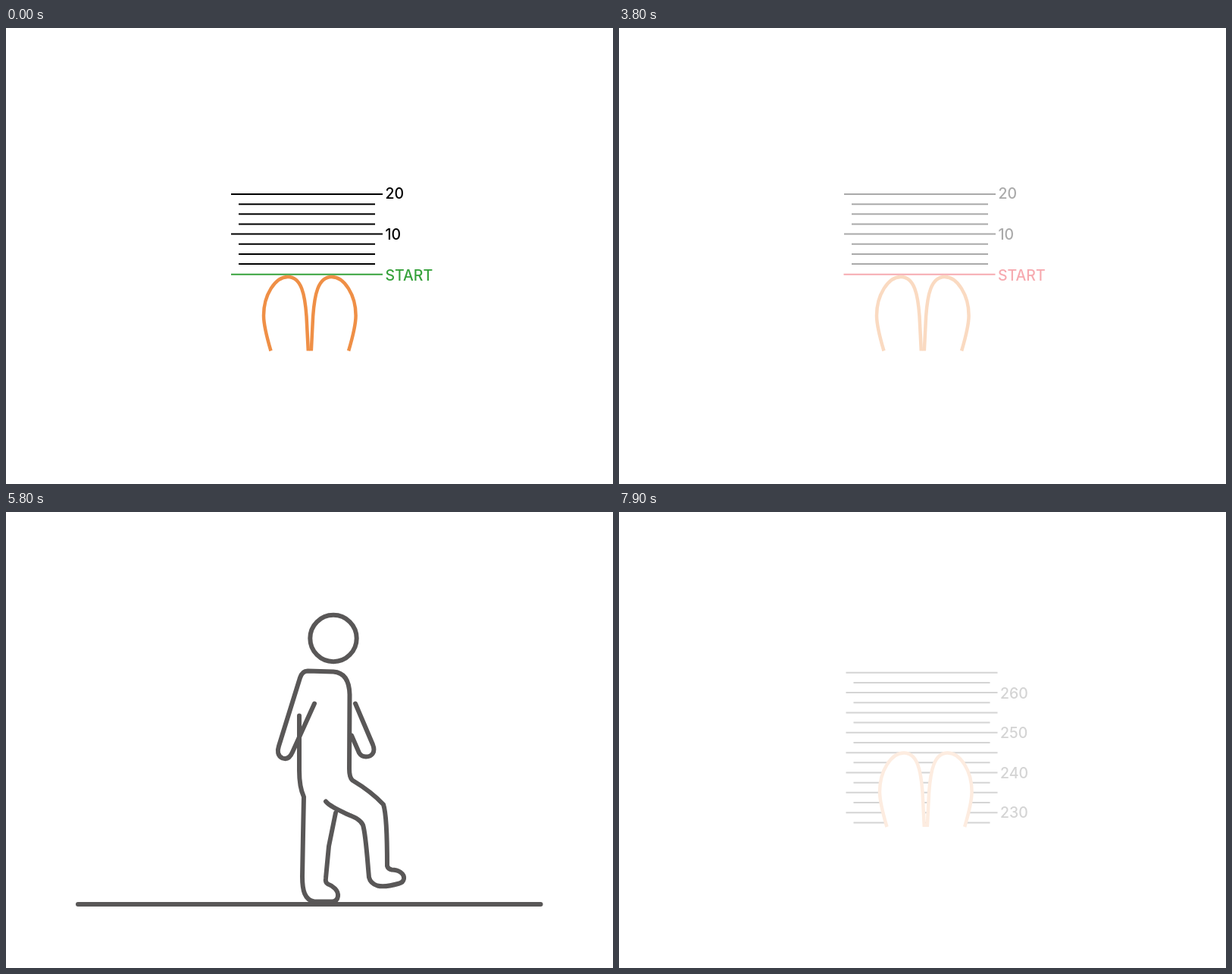
These frames come from a looping animation (801 px wide and 601 px high, 8 s). An HTML page:

```html
<!DOCTYPE html>
<html lang="en">
<head>
<meta charset="utf-8">
<title>Two-step walk</title>
<style>
  html, body { margin: 0; width: 100%; height: 100%; overflow: hidden; background: #fff; }
  svg { display: block; width: 801px; height: 601px; }
  text { font: 500 19.5px Inter, sans-serif; }
  .rule { stroke: #000; stroke-width: 2; }
  .feet { fill: #fff; stroke: #ef8f46; stroke-width: 4.5; }
  .walk { fill: none; stroke: #595757; stroke-width: 6; stroke-linecap: round; stroke-linejoin: round; }
</style>
</head>
<body>
<svg viewBox="0 0 801 601">
  <defs>
    <path id="foot" d="M349.5,425.5 C344,407 340,390 340,379 C340,352 355,328 372,328 C390,328 394.5,352 396.5,380 L398.8,425.5"/>
    <g id="feet" class="feet">
      <use href="#foot"/>
      <use href="#foot" transform="translate(801.6 0) scale(-1 1)"/>
    </g>
  </defs>
  <g id="start">
    <g id="startRules"></g>
    <g id="startLine">
      <path d="M297,324.8H497" stroke="currentColor" stroke-width="2"/>
      <text x="500.5" y="333" fill="currentColor">START</text>
    </g>
    <use href="#feet"/>
  </g>
  <g id="walk" class="walk">
    <path id="ground" d="M95,516.6H705.5"/>
    <g id="figure">
      <circle id="head" r="30.7"/>
      <path id="body"/>
    </g>
  </g>
  <g id="result">
    <g id="resultRules"></g>
    <use href="#feet" transform="translate(4 -10.5)"/>
  </g>
</svg>
<script>
const $ = id => document.getElementById(id);
const LOOP = 8000;

const rule = (x, y, width) => `<path class="rule" d="M${x},${y}h${width}"/>`;
const label = (x, y, value) => `<text x="${x}" y="${y}">${value}</text>`;

function rules(count, left, top, gap, longEvery) {
  let out = '';
  for (let i = 0; i < count; i++) {
    const inset = i % longEvery ? 10 : 0;
    out += rule(left + inset, top + i * gap, 200 - 2 * inset);
  }
  return out;
}

$('startRules').innerHTML = rules(8, 297, 219, 13.15, 4) +
  label(500.5, 225.3, 20) + label(500.5, 279, 10);
$('resultRules').innerHTML = rules(16, 299.5, 211.7, 13.18, 2) +
  [260, 250, 240, 230].map((n, i) => label(503, 246 + i * 52.4, n)).join('');

const STAND = {
  head: [137.3, 164.5],
  d: `M129,372 C118,371 113,362 112.5,348 L109,240 L110,222 Q111,210 122,210 L152,210
    C168,210 176,222 176,240 L176.5,322 C174,360 173,400 172.5,440 L172,487 Q172,490 176,492
    C184,495 189,501 187,507 Q186,513 180,513 L162,513 C150,513 145,510 143,500
    C141,492 141,480 139.5,468 L134,422 L129,372
    M118,254 L145,323 C148,331 153,334 159,333 C164,331 166,326 165,322 L141,232`
};

// The walking poses share one path layout so they can be blended:
// rear arm, torso and front leg; back and rear leg; front arm.
const STRIDE = {
  head: [314.5, 182.5],
  d: `M281,270 L230,331 C226,336 222,337.5 217.5,336 C210.5,333.5 210.5,326 214,321
    L271,233 Q274,226 281,226 L313,228 C328,229 334,240 334.5,258 L328,360 Q328,374 331,377
    C350,391 375,408 388,425 C398,445 407,470 414,490 Q416,492 421,492
    C430,492 437,497 436,504 Q435,508 430,510 C422,513 412,517 402,517 Q395,517 391,509
    C384,494 370,462 357,445 C353,440 345,437 335,432 C310,419 280,406 269,395
    M267,290 L262.5,360 Q262,372 258,381 L220,428 L168,463 C153,475 150,485 162,496
    L178,510 Q182,514 186,509 C192,503 190,492 187,488 Q186,483 191,481 L247,454 L292,419
    M341,272 L371,330 C376,340 370,347 362,347 Q356,347 353,342 L338,320`
};
const LIFT = {
  head: [182, 166],
  d: `M157,252 L128,316 C125,323 121,326 115,324 C108,321 108,314 110,308
    L138,218 Q141,209 148,209 L182,210 C197,211 203,222 203.5,240 L203,338 Q203,349 207,353
    C222,362 236,372 248,385 C253,400 253,440 253,466 Q254,470 259,471
    C268,471 276,476 275,483 Q274,488 269,489 C262,491 248,494 240,492 Q231,489 229,481
    C227,460 225,425 221,412 C218,405 210,402 203,399 C190,393 178,388 172,381
    M137,268 L137,340 Q137,362 143,375 L142,425 L141,480 C141,498 144,511 157,513
    L180,513 Q187,513 188,506 C189,498 181,492 175,490 Q171,488 172,482 L176,440 L185,396
    M211,252 L234,306 C238,316 233,322 225,322 Q219,322 216,317 L206,294`
};
const PASS = {
  head: [150, 165],
  d: `M131,252 L125,318 C124,326 119,331 113,329 C107,327 105,322 106,315
    L112,222 Q113,209 122,209 L157,209 C175,210 186,222 187,240 L187,330 Q187,342 186,352
    C185,375 182,400 181,420 C179,445 177,470 176,486 Q177,490 181,491
    C189,493 193,501 191,507 Q189,513 182,513 C174,514 165,513 157,513 Q148,511 146,500
    C144,480 141,450 140,430 C139,420 139,410 138,400 C137,390 136,382 136,373
    M111,268 L116,345 Q118,366 132,372 L130,425 L94,466 C82,478 84,488 93,496
    L108,508 Q113,512 117,506 C121,500 119,492 116,488 Q115,484 119,480 L139,453 L141,430
    M187,262 L203,316 C206,326 201,332 194,332 Q189,332 188,327 L187,318`
};

// time, pose, pose to blend with, share of the blend, distance walked
const WALK = [
  [0, STAND, STAND, 0, 0],
  [5100, PASS, LIFT, 0.6, 0],
  [5200, LIFT, LIFT, 0, 0],
  [5400, STRIDE, STRIDE, 0, 0],
  [5500, STRIDE, PASS, 0.5, 125],
  [5600, PASS, PASS, 0, 250],
  [5700, PASS, LIFT, 0.5, 250],
  [5800, LIFT, LIFT, 0, 250],
  [6000, STRIDE, STRIDE, 0, 250],
  [6100, STRIDE, PASS, 0.5, 375],
  [6200, STRIDE, PASS, 0.85, 462.5],
  [6300, STAND, STAND, 0, 500]
];

const lerp = (a, b, t) => a + (b - a) * t;
function mixPath(a, b, t) {
  const ends = b.match(/[\d.]+/g);
  let i = 0;
  return a.replace(/[\d.]+/g, n => lerp(+n, +ends[i++], t));
}

// Fades move in sixths, one step every 100 ms.
function fade(t, begin) {
  const steps = Math.floor((t - begin) / 100) + 1;
  return Math.min(1, Math.max(0, steps / 6));
}

function draw(t) {
  $('start').setAttribute('opacity', 1 - fade(t, 3500));
  $('walk').setAttribute('opacity', fade(t, 4100) - fade(t, 7300));
  $('result').setAttribute('opacity', fade(t, 7900));

  const red = t >= 3000 || (t >= 1000 && Math.floor(t / 500) % 2 === 0);
  $('startLine').setAttribute('color', red ? '#e60012' : '#37a23c');
  $('startLine').setAttribute('transform', `translate(${red ? -0.5 : 0} 0)`);

  const [, from, to, share, dx] = WALK.findLast(step => t >= step[0]);
  const sink = t < 5500 ? 0 : t < 6000 ? 0.5 : 1;
  $('body').setAttribute('d', mixPath(from.d, to.d, share));
  $('head').setAttribute('cx', lerp(from.head[0], to.head[0], share));
  $('head').setAttribute('cy', lerp(from.head[1], to.head[1], share));
  $('figure').setAttribute('transform', `translate(${dx} ${sink})`);
  $('ground').setAttribute('transform', `translate(0 ${sink})`);
}

const began = performance.now();
function tick() {
  draw((performance.now() - began) % LOOP);
  requestAnimationFrame(tick);
}
tick();
</script>
</body>
</html>
```
